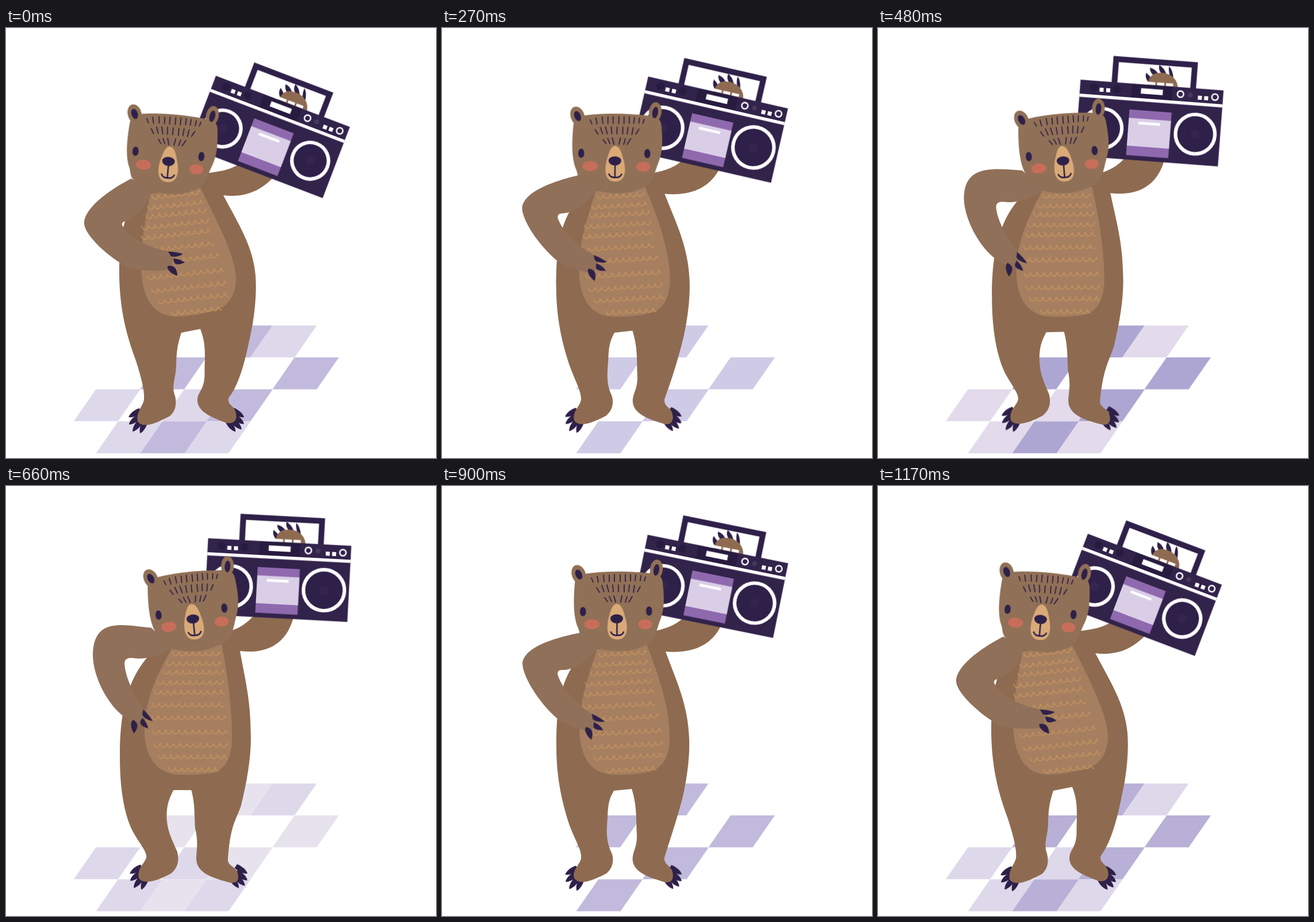
These frames come from a looping animation (748 by 748 pixels, 1200 ms). An HTML page without scripts:

```html
<!DOCTYPE html>
<html lang="en">
<head>
<meta charset="utf-8">
<title>Dancing bear</title>
<style>
html, body { margin: 0; width: 100%; height: 100%; overflow: hidden; background: #fff; }
svg { display: block; width: 100vw; height: 100vh; }

.navy { fill: #2e2049; }
.line { fill: none; stroke: #2e2049; stroke-linecap: round; }
.white { fill: #fff; }
.faint { fill: #281b40; }
.fur { fill: #8e6b50; }
.ring { fill: none; stroke: #fff; stroke-width: 2.6; }
.speaker { fill: #2e2049; stroke: #fff; stroke-width: 6.2; animation: pulse 1200ms linear infinite; }

/* Sine sway: ease in to the middle pose, ease out to the far one */
.sway { animation: 600ms cubic-bezier(.12,0,.39,0) infinite alternate; }
#body { animation-name: body; }
#belly { animation-name: belly; }
#scales { animation-name: scales; }
#arm { animation-name: arm; }
#paw { animation-name: paw; }
#box { animation-name: box; }
#head { animation-name: head; transform-origin: 302.5px 218px; }
#toesL { animation-name: toesL; }
#toesR { animation-name: toesR; }

#light { animation: light 1200ms step-end infinite; }
#dark { animation: dark 1200ms step-end infinite; }

@keyframes light {
  0%, 50%, 60%, 80%, 90%, 100% { fill: #ded8eb; }
  10%, 30%, 40% { fill: #e3dbeb; }
  20%, 70% { fill: #fff; }
}
@keyframes dark {
  0%, 70%, 100% { fill: #c2badc; }
  10%, 30%, 60%, 80% { fill: #fff; }
  20% { fill: #cfcae6; }
  40% { fill: #aea6d2; }
  50% { fill: #e6e3ee; }
  90% { fill: #b8b0d6; }
}
@keyframes pulse {
  0%, 100% { r: 31.8px; }
  10% { r: 33.8px; }
  22.5%, 55% { r: 35.7px; }
  40% { r: 34.3px; }
  75% { r: 34.8px; }
}
@keyframes body {
  0% { d: path("M250 270C204 310 197 360 197 430C198 500 214 545 225 576C234 603 242 632 240 647C238 658 226 668 229 684C238 700 270 683 285 675C298 664 296 648 294 640C287 620 296 610 296 585C297 562 298 552 305 530L338 523.5C348 550 346 565 345.5 600C346 630 333 632 333 648C334 670 362 678 383 687C400 690 404 678 398 664C393 655 386 655 387 644C410 615 420 560 429 515C434 485 436 455 434 430C430 380 404 340 378 291C410 295 438 287 463 262L445 225L408 235C395 244 380 249 352 252L300 260Z"); }
  50% { d: path("M270 270C202 315 199 390 199 455C199 515 212 560 221 588C231 616 244 634 242 648C240 658 226 668 230 682C240 698 270 682 286 674C299 663 299 648 295 638C285 618 286 600 288 575C289 555 290 545 299 530L330 527C337 550 338 565 338.5 600C341 628 332 632 331.5 650C333 674 365 682 387 689C402 692 404 680 400 668C394 658 386 658 387 646C400 605 410 575 419 540C428 500 431 465 430 440C428 380 408 340 389 288C425 291 464 284 484 246L455 215L417 232C405 242 390 248 371 252L310 260Z"); animation-timing-function: cubic-bezier(.61,1,.88,1); }
  100% { d: path("M278 270C212 315 198 390 198 470C198 520 203 560 216 592C226 616 247 635 244 647C241 657 228 664 231 682C240 696 270 684 287 674C301 663 301 648 298 636C288 612 280 600 279 575C279 555 283 545 291 529L322 529C328 552 327 565 328.5 595C335 622 331 632 331 650C333 676 365 683 390 690C405 692 406 682 402 670C395 660 385 660 386 648C390 590 398 585 408 558C420 510 427 465 425.5 430C425 370 417 340 408 287C446 292 486 281 500 231L468 205L431 226C418 240 408 246 395 251L330 260Z"); }
}
@keyframes belly {
  0% { d: path("M251 288C245 325 236 360 235 410C235 455 248 502 297 502C325 501 352 495 365 491C390 483 400 460 400 435C399 395 362 325 338 278Z"); }
  50% { d: path("M270 284C255 330 239 375 239 420C239 465 255 502 300 502C325 503 350 500 365 496C388 488 396 465 396 435C396 385 374 320 356 276Z"); animation-timing-function: cubic-bezier(.61,1,.88,1); }
  100% { d: path("M290 282C268 320 242 365 241 425C241 470 262 502 303 502C325 503 350 501 364 498C386 489 393 465 393 435C393 385 385 320 376 276Z"); }
}
@keyframes scales {
  0% { transform: matrix(1, -.11, .21, 1, -97, 35); }
  50% { transform: matrix(1, -.055, .105, 1, -48, 18); animation-timing-function: cubic-bezier(.61,1,.88,1); }
  100% { transform: matrix(1, 0, 0, 1, 1, 0); }
}
@keyframes arm {
  0% { d: path("M218 262C190 276 136 310 136 340C136 360 180 400 210 415C235 424 260 423 284 421C292 415 292 400 287 389C260 385 220 372 204 346C201 342 201 339 205 337C225 330 248 310 252 284Z"); }
  50% { d: path("M242 255C205 262 142 278 140 309C141 335 175 385 205 408C220 416 235 421 252 427C268 424 272 410 262 397C245 388 212 358 203 333C199 324 202 320 208 320C232 321 258 300 272 282Z"); animation-timing-function: cubic-bezier(.61,1,.88,1); }
  100% { d: path("M253 246C205 241 157 226 152 285C148 325 176 381 207 402C213 407 216 410 222 410C238 410 245 397 239 387C225 371 209 334 207 314C205 303 208 298 219 298C245 303 276 292 292 281Z"); }
}
@keyframes paw {
  0% { transform: translate(285px, 403px); }
  50% { transform: translate(258px, 410.5px) rotate(22deg); animation-timing-function: cubic-bezier(.61,1,.88,1); }
  100% { transform: translate(230px, 400.5px) rotate(43deg); }
}
@keyframes box {
  0% { transform: translate(458px, 189.5px) rotate(20.9deg); }
  50% { transform: translate(466.9px, 174.5px) rotate(11.4deg); animation-timing-function: cubic-bezier(.61,1,.88,1); }
  100% { transform: translate(473px, 163.1px) rotate(2.6deg); }
}
@keyframes head {
  0% { transform: translate(-20.2px, 1px) rotate(5.1deg); }
  50% { transform: none; animation-timing-function: cubic-bezier(.61,1,.88,1); }
  100% { transform: translate(20.8px, .5px) rotate(-5.9deg); }
}
@keyframes toesL {
  0% { transform: none; }
  50% { transform: translate(1px, -1px); animation-timing-function: cubic-bezier(.61,1,.88,1); }
  100% { transform: translate(2px, -3px); }
}
@keyframes toesR {
  0% { transform: none; }
  50% { transform: translate(3px, -1.5px); animation-timing-function: cubic-bezier(.61,1,.88,1); }
  100% { transform: translate(6px, -3px); }
}
</style>
</head>
<body>
<svg viewBox="0 0 748 748">
  <defs>
    <path id="tile" d="M0 0h77l-38.5 55.6h-77z"/>
    <path id="claw" d="M0-4C10-6 20-4 24 0C18 5 8 6 0 4Z"/>
    <path id="row" pathLength="12" d="M0 0c1 9 8 10 11.6 0c1 9 8 10 11.6 0c1 9 8 10 11.6 0c1 9 8 10 11.6 0c1 9 8 10 11.6 0c1 9 8 10 11.6 0c1 9 8 10 11.6 0c1 9 8 10 11.6 0c1 9 8 10 11.6 0c1 9 8 10 11.6 0c1 9 8 10 11.6 0c1 9 8 10 11.6 0"/>
  </defs>

  <g id="light">
    <use href="#tile" x="463.5" y="517.5"/>
    <use href="#tile" x="156.5" y="628.5"/>
    <use href="#tile" x="310" y="628.5"/>
    <use href="#tile" x="195" y="684.2"/>
    <use href="#tile" x="348.5" y="684.2"/>
  </g>
  <g id="dark">
    <use href="#tile" x="386.5" y="517.5"/>
    <use href="#tile" x="271.5" y="573"/>
    <use href="#tile" x="502" y="573"/>
    <use href="#tile" x="387" y="628.5"/>
    <use href="#tile" x="272" y="684.2"/>
  </g>

  <g id="toesL" class="sway navy">
    <use href="#claw" transform="translate(234 665) rotate(150)"/>
    <use href="#claw" transform="translate(233 675) rotate(143)"/>
    <use href="#claw" transform="translate(235 683) rotate(128)"/>
    <use href="#claw" transform="translate(243 683) rotate(114)"/>
  </g>
  <g id="toesR" class="sway navy">
    <use href="#claw" transform="translate(394 664) rotate(33)"/>
    <use href="#claw" transform="translate(395 674) rotate(38)"/>
    <use href="#claw" transform="translate(393 681) rotate(46)"/>
    <use href="#claw" transform="translate(385 683) rotate(54)"/>
  </g>

  <path id="body" class="sway fur"/>
  <path id="belly" class="sway" fill="#a67f60"/>
  <g id="scales" class="sway" fill="none" stroke="#c4935c" stroke-width="1.5">
    <use href="#row" x="290" y="288" stroke-dasharray="7.2 20"/>
    <use href="#row" x="279" y="305" stroke-dasharray="8.3 20"/>
    <use href="#row" x="273" y="320" stroke-dasharray="9.2 20"/>
    <use href="#row" x="262" y="338" stroke-dasharray="10.1 20"/>
    <use href="#row" x="258" y="355" stroke-dasharray="10.5 20"/>
    <use href="#row" x="254" y="377" stroke-dasharray="10.7 20"/>
    <use href="#row" x="253" y="399" stroke-dasharray="11.2 20"/>
    <use href="#row" x="254" y="424" stroke-dasharray="11.4 20"/>
    <use href="#row" x="256" y="447" stroke-dasharray="11.2 20"/>
    <use href="#row" x="263" y="467" stroke-dasharray="10.5 20"/>
    <use href="#row" x="282" y="489" stroke-dasharray="7.5 20"/>
  </g>

  <path id="arm" class="sway" fill="#907059"/>
  <path id="paw" class="sway navy" d="M-3-14Q10-14 23-10Q12-3 2-6ZM6-2Q17-2 26 5Q14 10 9 7Q6 3 6-2ZM-4 11Q4 9 9 14Q13 20 13 28Q0 24-4 15Z"/>

  <g id="box" class="sway">
    <path class="navy" d="M-6-70Q-14-77-12-87Q-6-83-2-77ZM3-82Q-6-88-6-96Q3-95 9-87ZM15-87Q8-94 10-102Q18-98 23-88ZM30-84Q26-93 27-101Q34-95 36-81Z"/>
    <path class="fur" d="M-7-65C-8-80 0-88 13-88.5C30-90 44-80 45-64Z"/>
    <path fill="none" stroke="#2e2049" stroke-width="10" d="M-65.6-64V-106.7H71.6V-64"/>
    <path class="white" d="M-7-71.5h12.5v5h-12.5zM8.5-71.5h12.5v5h-12.5zM24-71.5h12.5v5h-12.5z"/>
    <rect fill="#32234b" x="-124.7" y="-66.3" width="249.4" height="132.6"/>
    <rect class="faint" x="-35" y="-66" width="71" height="24"/>
    <rect class="white" x="-124.7" y="-42" width="249.4" height="5.5"/>
    <circle class="faint" cx="-100.5" cy="-54.5" r="7"/>
    <circle class="faint" cx="-60.5" cy="-54.5" r="7"/>
    <circle fill="#453a5e" cx="67.5" cy="-54" r="4.3"/>
    <path class="white" d="M-90.5-55h7v7h-7zM-79-55h7v7h-7zM81-54h7v7h-7zM92-54h7v7h-7zM-18.5-59.5h38v9.5h-38z"/>
    <circle class="ring" cx="50.5" cy="-54.2" r="5.4"/>
    <circle class="ring" cx="110.7" cy="-53.6" r="5.4"/>
    <rect x="-36" y="-21" width="73.5" height="79.5" fill="#8f69ae"/>
    <rect x="-36" y="-6.5" width="73.5" height="48.5" fill="#dacee7"/>
    <rect class="white" x="-19" y="-1" width="38" height="4.6"/>
    <circle class="speaker" cx="-81.1" cy="15.3"/>
    <circle class="speaker" cx="81.2" cy="13.3"/>
    <circle fill="#34254f" cx="-81.1" cy="15.3" r="8"/>
    <circle fill="#34254f" cx="81.2" cy="13.3" r="8"/>
  </g>

  <g id="head" class="sway">
    <g fill="#907056">
      <ellipse cx="238" cy="154" rx="12" ry="17" transform="rotate(-20 238 154)"/>
      <ellipse cx="373" cy="145" rx="11" ry="17" transform="rotate(6 373 145)"/>
      <path d="M231 170C232 159 237 155 248 153C285 147 330 148 364 152C378 153 383 158 384 168C387 195 387 212 381 230C375 243 372 268 356 276C338 285 325 287.5 305 287.5C285 287 262 281 249 271C238 262 241 255 236 245C228 225 229 195 231 170Z"/>
    </g>
    <g class="navy">
      <ellipse cx="238" cy="154" rx="5.5" ry="9" transform="rotate(-24 238 154)"/>
      <ellipse cx="373" cy="146" rx="5" ry="10" transform="rotate(9 373 146)"/>
      <ellipse cx="245.3" cy="218.5" rx="5.3" ry="8"/>
      <ellipse cx="360.3" cy="217.5" rx="5.3" ry="8"/>
    </g>
    <g fill="#c76e5a">
      <ellipse cx="261" cy="240.5" rx="13.3" ry="8.7"/>
      <ellipse cx="353.5" cy="240.5" rx="12.3" ry="8.7"/>
    </g>
    <path fill="#d9aa78" d="M304 205C297 205 294 215 290 229C286 246 286 267 305 267C324 267 324 246 319 229C315 213 311 205 304 205Z"/>
    <path class="navy" d="M293 230C294 221 314 221 315 230C315 236 309 239 304.5 239C299 239 293 236 293 230Z"/>
    <path class="line" stroke-width="2.5" d="M304.5 237V259M294 254Q296 260 305 260Q314 260 316 254"/>
    <path class="line" stroke-width="1.8" d="M260 160l3 7M270 157l2 10M281 155l1 11M291 155v11M300 154v12M310 154v12M319 154v12M328 154v11M337 155l-1 10M346 156l-1 9M354 158l-2 7M269 177l5 8M278 173l4 11M287 172l3 12M297 172l1 12M307 172v12M317 172v12M326 172l-1 12M335 173l-2 12M345 175l-5 9M283 194l5 7M291 192l4 9M299 191l3 11M313 191l-2 11M322 192l-3 10M331 192l-6 10"/>
  </g>
</svg>
</body>
</html>
```
